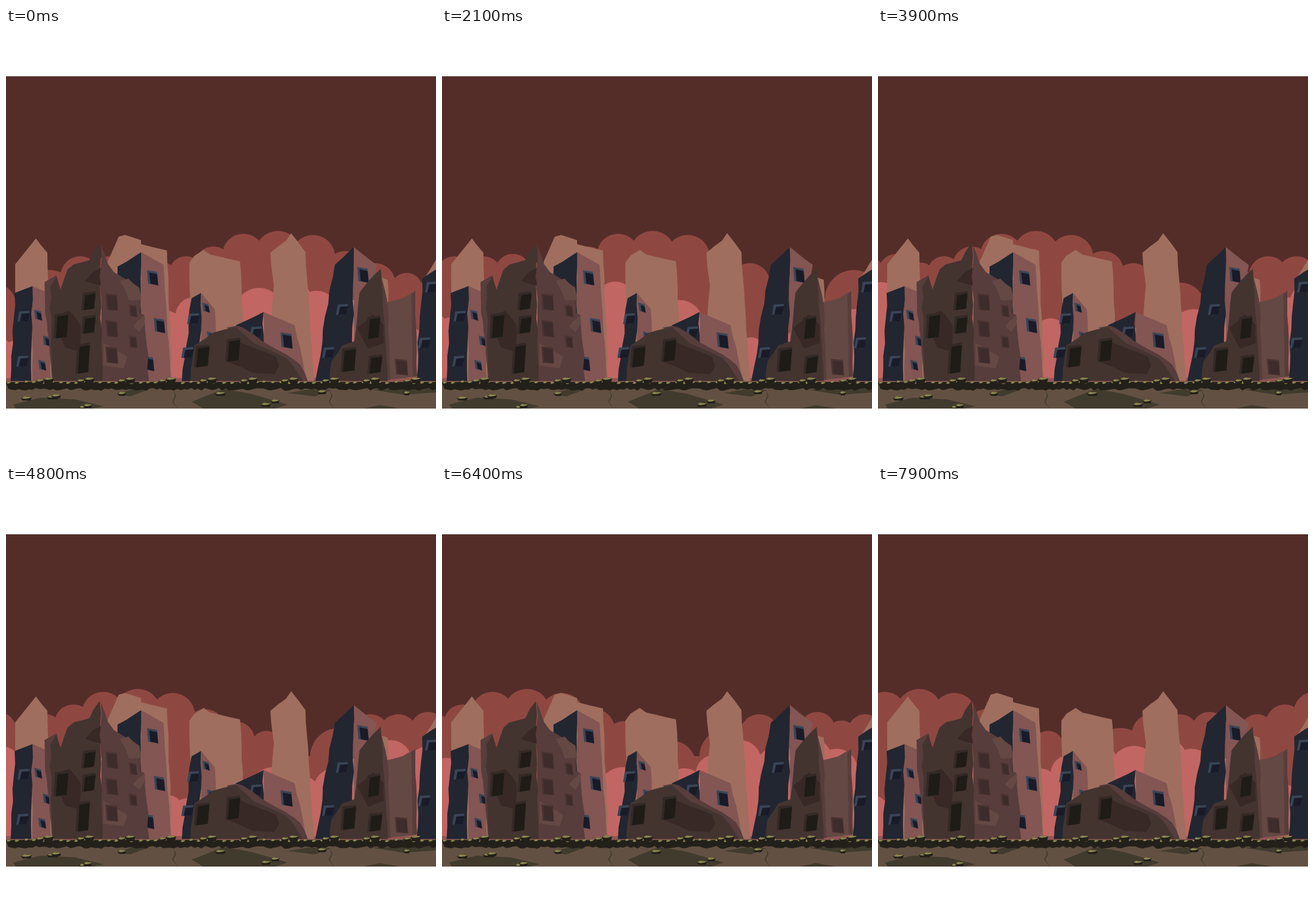
These frames come from a looping animation (748 px wide and 748 px high, 8 s). An HTML page with a canvas:

```html
<!DOCTYPE html>
<html lang="en">
<head>
<meta charset="utf-8">
<title>Ruined city</title>
<style>
html, body { margin: 0; width: 100%; height: 100%; overflow: hidden; background: #fff; }
canvas { display: block; }
</style>
</head>
<body>
<canvas id="stage" width="748" height="748"></canvas>
<script>
const ctx = document.getElementById('stage').getContext('2d');
const W = 748, TOP = 84, BOTTOM = 662, BASE = 614, LOOP = 8000;

const C = {
  sky: '#542d29', far: '#8f4841', near: '#c26663', tan: '#9f6e5e',
  navy: '#222631', mauve: '#835553', frame: '#394556', glass: '#1a1b28',
  dark: '#433430', side: '#573d3c', wall: '#644843', patch: '#382826',
  hole: '#1f1c17', rim: '#342926', recess: '#3d2c2b', ground: '#625142',
  soil: '#23201a', moss: '#8d8653', shade: '#413b2e', haze: '#945453'
};

let seed = 11;
const rand = () => (seed = seed * 16807 % 2147483647) / 2147483647;
const parse = text => text.split(' ').map(pair => pair.split(',').map(Number));

const scene = [];
function add(color, corners) {
  scene.push({ color, path: new Path2D(`M${corners.join(' ')}Z`) });
}

// Fills a polygon whose long edges are broken up by small random chips
function rough(color, corners, chip = 2) {
  const out = [];
  corners.forEach(([x, y], i) => {
    const [x2, y2] = corners[(i + 1) % corners.length];
    const parts = Math.ceil(Math.hypot(x2 - x, y2 - y) / 24);
    for (let k = 0; k < parts; k++) {
      const t = k / parts, shift = k ? (rand() - .5) * 2 * chip : 0;
      out.push([x + (x2 - x) * t + shift, y + (y2 - y) * t]);
    }
  });
  add(color, out);
}
const ruin = (color, text, chip) => rough(color, parse(text), chip);

// A window centred on x, y: lean moves its bottom edge sideways
function pane(color, x, y, w, h, lean, drop) {
  add(color, [[x - w / 2, y - h / 2], [x + w / 2, y - h / 2 + drop],
    [x + w / 2 + lean, y + h / 2 + drop], [x - w / 2 + lean, y + h / 2]]);
}
function opening(rim, fill, x, y, w, h, lean, drop, inset) {
  pane(rim, x, y, w, h, lean, drop);
  pane(fill, x + inset, y + Math.abs(inset), w - 4, h - 4, lean, drop);
}
const brokenWindow = (x, y, w, h) => opening(C.rim, C.hole, x, y, w + 4, h + 4, -3, -3, 2);
const sideWindow = (x, y, w, h) => opening('#4a3331', C.recess, x, y, w, h, 2, 2, 1);

// A two-faced tower: left base, left top, ridge, right top, right base
function tower(left, [lx, ly], [mx, my], [rx, ry], right, windows) {
  rough(C.mauve, [[mx, my], [rx, ry], [right, BASE], [mx, BASE]], 1);
  rough(C.navy, [[left, BASE], [lx, ly], [mx, my], [mx - 2, BASE]]);
  for (const [x, y] of parse(windows)) {
    const w = x < mx ? 18 : Math.min(19, (rx - mx) * .45);
    if (x < mx) opening(C.frame, C.glass, x, y, w, 18, -3, -1, 2);
    else opening(C.frame, C.glass, x, y, w, w * 1.35, 2, 3, 2);
  }
}

// Cloud banks: key points are the tops of the bumps; a bump's size follows its neighbours
function makeBank(color, speed, floor, text) {
  const tops = parse(text), n = tops.length, path = new Path2D();
  tops.forEach(([x, y], i) => {
    const before = tops[(i + n - 1) % n][0], after = tops[(i + 1) % n][0];
    const r = ((after - before + W) % W) * .33;
    path.moveTo(x + r, y + r);
    path.arc(x, y + r, r, 0, -Math.PI, true);
    path.lineTo(x - r, 620);
    path.lineTo(x + r, 620);
    path.closePath();
  });
  return { color, speed, floor, path };
}
const banks = [
  makeBank(C.far, .0508, 470, '413,358 473,353 534,360 590,388 642,409 697,426 725,443 823,421 877,397 926,397 978,393 1020,408 1061,397 1109,380'),
  makeBank(C.near, .094, 549, '20,543 87,517 168,489 215,503 275,491 327,468 372,442 440,452 499,441 540,457 610,473 667,505 700,518 735,538')
];

// Distant skyline
add(C.haze, [[0, 609], [W, 609], [W, 620], [0, 620]]);
ruin(C.tan, '16,614 16,411 45,375 52,366 61,378 72,391 80,614', 1);
ruin(C.tan, '174,614 177,406 196,363 207,360 235,369 235,376 280,387 289,614', 1);
ruin(C.tan, '322,614 319,408 328,396 344,386 355,394 407,406 417,614', 1);
ruin(C.tan, '450,614 466,448 460,391 487,370 496,357 521,390 536,614', 1);
ruin(C.tan, '640,430 664,438 665,500', 1);
ruin(C.tan, '730,432 748,403 748,614', 1);

// Blue towers
tower(8, [15, 461], [46, 449], [72, 460], 78, '32,502 30,580 55,498 70,543 62,585');
tower(200, [194, 415], [235, 390], [274, 412], 287, '254,433 266,516 247,582');
tower(306, [323, 470], [339, 461], [363, 489], 372, '327,506 317,565 347,485 355,535');
tower(400, [400, 517], [448, 494], [502, 517], 524, '436,529 487,542');
tower(538, [572, 412], [605, 381], [645, 412], 607, '586,490 562,565 620,428');
tower(714, [724, 436], [762, 412], [780, 420], 780, '741,451 729,548');

// Left ruin
ruin(C.side, '80,614 75,545 68,495 67,442 88,430 98,614', 1);
ruin(C.side, '165,376 177,410 188,425 232,452 233,495 241,500 249,614 165,614');
ruin(C.dark, '82,614 79,525 77,450 88,432 95,455 107,420 118,411 145,404 163,374 168,614');
ruin(C.patch, '84,500 110,492 130,518 127,562 103,556');
ruin(C.patch, '138,440 151,425 165,417 165,448');
ruin(C.wall, '198,440 213,436 232,452 235,473 214,474');
ruin(C.wall, '169,548 211,572 205,592 169,587');
ruin(C.wall, '241,500 241,515 232,529 221,519');
brokenWindow(97, 519, 19, 38);
brokenWindow(145, 476, 18, 26);
brokenWindow(145, 517, 18, 26);
brokenWindow(135, 576, 18, 47);
for (let row = 0; row < 3; row++) {
  sideWindow(183, 476 + row * 46, 20, 28);
  if (row < 2) sideWindow(220, 491 + row * 54, 13, 20);
}

// Middle rubble
ruin(C.side, '384,521 402,518 412,521 446,545 488,568 512,586 525,614 480,614');
ruin(C.dark, '321,614 328,552 360,530 400,520 432,549 488,574 517,614');
ruin(C.patch, '398,543 470,572 475,588 467,602 430,600 381,579');
brokenWindow(342, 572, 20, 33);
brokenWindow(396, 561, 19, 35);

// Right ruin
ruin(C.wall, '663,477 690,470 711,458 714,607 664,612', 1);
ruin(C.side, '705,464 712,457 715,605 708,607', 1);
ruin(C.side, '650,420 664,480 669,612 655,614', 1);
ruin(C.dark, '563,614 566,580 585,552 606,545 615,460 640,430 652,419 664,614', 1);
ruin(C.patch, '611,521 638,498 657,517 657,548 630,558');
brokenWindow(597, 578, 20, 37);
brokenWindow(640, 522, 18, 34);
brokenWindow(643, 586, 19, 27);
sideWindow(687, 589, 21, 27);

// Ground with dark patches and cracks
add(C.ground, [[0, 615], [W, 615], [W, 663], [0, 663]]);
ruin(C.shade, '12,655 60,643 120,646 170,658 145,663 18,663', 0);
ruin(C.shade, '193,637 225,627 245,630 216,641', 0);
ruin(C.shade, '323,650 378,628 425,636 490,655 465,663 345,663', 0);
ruin(C.shade, '490,635 525,629 565,630 537,641', 0);
ruin(C.shade, '636,629 748,626 748,634 692,638', 0);
ruin(C.shade, '618,663 650,656 692,663', 0);
for (const x of [291, 563]) ruin(C.shade, `${x},629 ${x + 5},640 ${x},650 ${x + 8},663 ${x - 2},650 ${x + 3},640`, 0);

// Jagged soil band, then mossy clods on and below it
const edge = [[0, 616], [W, 616]];
for (let x = W; x >= 0; x -= 6) edge.push([x, 626 + rand() * 5]);
add(C.soil, edge);

function clod(x, y, w, h) {
  add(C.soil, [[x, y + 3], [x + w * .3, y], [x + w, y + 1], [x + w - 2, y + h], [x + 3, y + h]]);
  add(C.moss, [[x + 1, y + 3], [x + w * .3, y], [x + w, y + 1], [x + w * .75, y + 3], [x + w * .4, y + 4]]);
}
for (let x = 0; x < W; x += 12 + rand() * 5) clod(x, 613 + rand() * 3, 9, 7);
for (let x = 62; x < W; x += 71) {
  clod(x - 10, 611, 14, 9);
  clod(x + 3, 608, 18, 10);
}
for (const [x, y] of parse('26,641 71,639 78,637 194,633 127,657 134,654 363,633 443,652 460,646 541,630 691,632'))
  clod(x, y, 11 + (y * 5 + x) % 11, 7);

function drawBank({ color, speed, floor, path }, time) {
  ctx.fillStyle = color;
  ctx.fillRect(0, floor, W, 620 - floor);
  for (let i = -1; i < 3; i++) {
    ctx.save();
    ctx.translate(i * W - speed * time, 0);
    ctx.fill(path);
    ctx.restore();
  }
}

function draw(now) {
  const time = Math.floor(now % LOOP / 100) * 100;
  ctx.clearRect(0, 0, W, W);
  ctx.save();
  ctx.beginPath();
  ctx.rect(0, TOP, W, BOTTOM - TOP);
  ctx.clip();
  ctx.fillStyle = C.sky;
  ctx.fillRect(0, TOP, W, BOTTOM - TOP);
  for (const bank of banks) drawBank(bank, time);
  for (const { color, path } of scene) {
    ctx.fillStyle = color;
    ctx.fill(path);
  }
  ctx.restore();
}

const start = performance.now();
function tick() {
  draw(performance.now() - start);
  requestAnimationFrame(tick);
}
tick();
</script>
</body>
</html>
```
